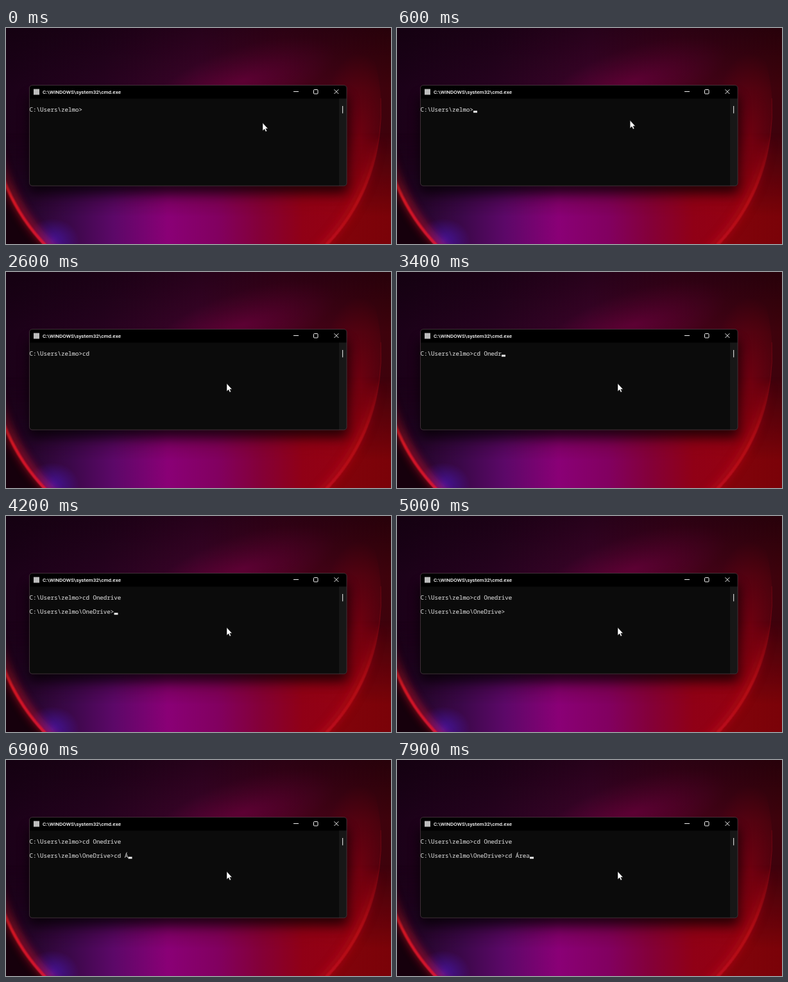
An HTML page for the animation above (8000 ms loop, 600 by 338 pixels).

```html
<!DOCTYPE html>
<html lang="en">
<head>
<meta charset="utf-8">
<title>Terminal</title>
<style>
  html, body { margin: 0; width: 100%; height: 100%; overflow: hidden; background: #1b0014; }
  svg { display: block; width: 600px; height: 338px; }
  .title { font: 500 8.1px Roboto, "Open Sans", sans-serif; fill: #fff; }
  .line { font: 9.17px "Noto Sans Mono", "DejaVu Sans Mono", monospace; fill: #ccc; stroke: #ccc; stroke-width: .15px; white-space: pre; }
</style>
</head>
<body>
<svg viewBox="0 0 600 338">
  <defs>
    <linearGradient id="base">
      <stop offset="0" stop-color="#1b0118"/>
      <stop offset=".25" stop-color="#26021f"/>
      <stop offset=".5" stop-color="#3c0329"/>
      <stop offset=".72" stop-color="#45021c"/>
      <stop offset="1" stop-color="#3e020b"/>
    </linearGradient>
    <linearGradient id="topShade" x2="0" y2="1">
      <stop offset="0" stop-color="#0c0008" stop-opacity=".45"/>
      <stop offset=".28" stop-color="#0c0008" stop-opacity="0"/>
    </linearGradient>
    <linearGradient id="outside">
      <stop offset="0" stop-color="#16000c"/>
      <stop offset=".25" stop-color="#16000c"/>
      <stop offset=".8" stop-color="#86040c"/>
      <stop offset="1" stop-color="#7a0208"/>
    </linearGradient>
    <linearGradient id="floor">
      <stop offset="0" stop-color="#1c0420"/>
      <stop offset=".08" stop-color="#2a0632"/>
      <stop offset=".17" stop-color="#3c084a"/>
      <stop offset=".28" stop-color="#5c0868"/>
      <stop offset=".42" stop-color="#8a0076"/>
      <stop offset=".55" stop-color="#820060"/>
      <stop offset=".66" stop-color="#840038"/>
      <stop offset=".77" stop-color="#900016"/>
      <stop offset="1" stop-color="#98040e"/>
    </linearGradient>
    <linearGradient id="fade" gradientUnits="userSpaceOnUse" x1="0" y1="165" x2="0" y2="295">
      <stop offset="0" stop-color="#fff" stop-opacity="0"/>
      <stop offset="1" stop-color="#fff"/>
    </linearGradient>
    <linearGradient id="ringFade" gradientUnits="userSpaceOnUse" x1="0" y1="170" x2="0" y2="270">
      <stop offset="0" stop-color="#fff" stop-opacity="0"/>
      <stop offset="1" stop-color="#fff"/>
    </linearGradient>
    <linearGradient id="ringTint">
      <stop offset="0" stop-color="#f01c22"/>
      <stop offset=".2" stop-color="#e8142a"/>
      <stop offset=".8" stop-color="#c81020"/>
      <stop offset="1" stop-color="#b00c14"/>
    </linearGradient>
    <radialGradient id="rose"><stop stop-color="#6c003c"/><stop offset="1" stop-color="#6c003c" stop-opacity="0"/></radialGradient>
    <radialGradient id="red"><stop stop-color="#8c0010"/><stop offset="1" stop-color="#8c0010" stop-opacity="0"/></radialGradient>
    <radialGradient id="blue"><stop stop-color="#4a18b4"/><stop offset="1" stop-color="#4a18b4" stop-opacity="0"/></radialGradient>
    <mask id="floorMask"><rect width="600" height="338" fill="url(#fade)"/></mask>
    <mask id="ringMask"><rect width="600" height="338" fill="url(#ringFade)"/></mask>
    <clipPath id="disc"><circle cx="280" cy="130" r="305"/></clipPath>
    <clipPath id="stage"><rect width="600" height="338"/></clipPath>
    <clipPath id="frame"><rect x="37" y="90" width="494" height="157" rx="4"/></clipPath>
    <filter id="glow" x="-20%" y="-20%" width="140%" height="140%"><feGaussianBlur stdDeviation="7"/></filter>
    <filter id="shade" x="-20%" y="-30%" width="140%" height="160%"><feGaussianBlur stdDeviation="9"/></filter>
    <filter id="edge" x="-20%" y="-20%" width="140%" height="140%"><feGaussianBlur stdDeviation="1.3"/></filter>
  </defs>

  <g clip-path="url(#stage)">
    <rect width="600" height="338" fill="url(#base)"/>
    <ellipse cx="370" cy="82" rx="150" ry="52" fill="url(#rose)" opacity=".75" transform="rotate(-18 370 82)"/>
    <rect width="600" height="338" fill="url(#topShade)"/>
    <rect width="600" height="338" fill="url(#outside)" mask="url(#floorMask)"/>
    <g clip-path="url(#disc)">
      <ellipse cx="550" cy="170" rx="60" ry="130" fill="url(#red)" opacity=".6"/>
      <rect width="600" height="338" fill="url(#floor)" mask="url(#floorMask)"/>
      <ellipse cx="72" cy="334" rx="42" ry="36" fill="url(#blue)" opacity=".8"/>
    </g>
    <g fill="none" stroke="url(#ringTint)" mask="url(#ringMask)">
      <circle cx="280" cy="130" r="300" stroke-width="12" opacity=".55" filter="url(#glow)"/>
      <circle cx="280" cy="130" r="303" stroke-width="4.5" opacity=".85" filter="url(#edge)"/>
    </g>
    <path d="M584 110A305 305 0 0 1 567 230" fill="none" stroke="#8a0a16" opacity=".5"/>
    <rect x="35" y="106" width="498" height="153" rx="8" fill="#000" opacity=".7" filter="url(#shade)"/>
  </g>

  <g clip-path="url(#frame)">
    <rect x="37" y="90" width="494" height="157" fill="#0b0b0b"/>
    <rect x="37" y="90" width="494" height="20.5" fill="#000"/>
    <rect x="519" y="110.5" width="12" height="137" fill="#171717"/>
  </g>
  <rect x="36.5" y="89.5" width="494.5" height="157.5" rx="4.5" fill="none" stroke="#4a3a40" stroke-width=".8"/>
  <rect x="43" y="95.5" width="9" height="9" fill="#bdbdbd"/>
  <text class="title" x="57" y="103">C:\WINDOWS\system32\cmd.exe</text>
  <g fill="none" stroke="#f4f4f4">
    <path d="M448 99.5H456M511.5 96.2L518.3 103M518.3 96.2L511.5 103"/>
    <rect x="479.5" y="96.5" width="6.5" height="6.5" rx="1"/>
  </g>
  <rect x="524" y="122" width="1.2" height="11.5" fill="#d0d0d0"/>

  <text class="line" id="first" x="36.5" y="130.7"></text>
  <text class="line" id="second" x="36.5" y="152.7"></text>
  <rect id="caret" width="6" height="3" fill="#f2f2f2"/>
  <path id="pointer" d="M0 -.5V11.8L2.8 9.2L4.7 13.2L6.6 12.3L4.8 8.5H8.3Z" fill="#fff" stroke="#111" stroke-width=".5"/>
</svg>
<script>
const LOOP = 8000, STEP = 100, CELL = 5.5;
const HOME = "C:\\Users\\zelmo";
const ENTER = 3900;

// [time, typed text]
const firstKeys = [
  [0, ""], [2400, "c"], [2500, "cd"], [2700, "cd "], [3000, "cd O"], [3100, "cd On"],
  [3200, "cd One"], [3300, "cd Oned"], [3400, "cd Onedr"], [3500, "cd Onedri"],
  [3600, "cd Onedriv"], [3700, "cd Onedrive"]
];
const secondKeys = [
  [0, ""], [5500, "c"], [5600, "cd"], [5800, "cd "], [6000, "cd A"], [6500, "cd "],
  [6900, "cd Á"], [7200, "cd Ár"], [7400, "cd Áre"], [7600, "cd Área"]
];
// [time, caret visible]
const blinks = [
  [0, 0], [200, 1], [700, 0], [1200, 1], [1800, 0], [2300, 1], [2500, 0], [2700, 1],
  [4500, 0], [5100, 1], [6300, 0], [6500, 1]
];
// [time, x, y]
const moves = [[0, 400, 149], [300, 400, 149], [1200, 258, 134], [1400, 258, 134], [2200, 344, 175]];

const $ = id => document.getElementById(id);
const at = (keys, t) => keys.filter(k => k[0] <= t).pop()[1];

function pointerAt(t) {
  const i = moves.findIndex(m => m[0] > t);
  if (i < 0) return moves[moves.length - 1].slice(1);
  const [t0, x0, y0] = moves[i - 1], [t1, x1, y1] = moves[i];
  const p = (t - t0) / (t1 - t0), e = p * p * (3 - 2 * p);
  return [x0 + (x1 - x0) * e, y0 + (y1 - y0) * e];
}

function draw(now) {
  const t = Math.floor(now % LOOP / STEP) * STEP;
  const entered = t >= ENTER;
  const top = HOME + ">" + at(firstKeys, t);
  const next = entered ? HOME + "\\OneDrive>" + at(secondKeys, t) : "";
  $("first").textContent = top;
  $("second").textContent = next;

  const caret = $("caret");
  caret.setAttribute("x", 36.5 + (entered ? next : top).length * CELL);
  caret.setAttribute("y", entered ? 151.5 : 129.5);
  caret.setAttribute("opacity", at(blinks, t));
  $("pointer").setAttribute("transform", `translate(${pointerAt(t)})`);
}

function tick() {
  draw(performance.now());
  requestAnimationFrame(tick);
}
tick();
</script>
</body>
</html>
```
